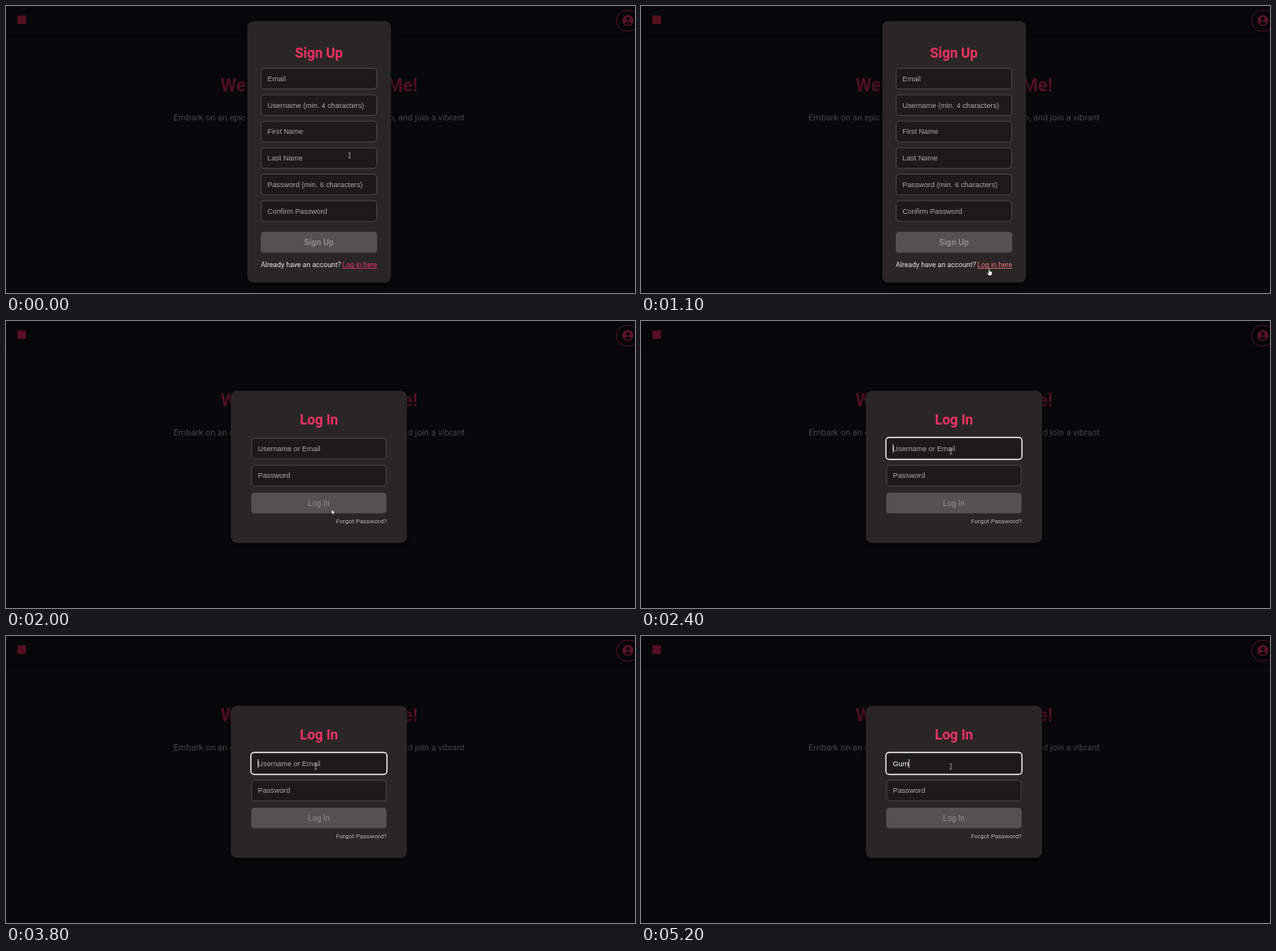
Animation of 800x366 px, one loop 5.3 s. Source, as an HTML page:

```html
<!DOCTYPE html>
<html lang="en">
<head>
<meta charset="utf-8">
<title>Sign up and log in</title>
<style>
  html, body { margin: 0; width: 100%; height: 100%; overflow: hidden; background: #08070a; }
  svg { display: block; width: 100vw; height: 100vh; }
  text { font-family: Roboto, sans-serif; white-space: pre; }
  .title { font-size: 17.5px; font-weight: 700; fill: #ee3262; text-anchor: middle; }
  .hero { font-size: 23px; font-weight: 700; fill: #4e1021; }
  .lead { font-size: 11.2px; fill: #454446; }
  .note { font-size: 9px; fill: #e6e5e5; }
  .forgot { font-size: 8px; fill: #b4b2b2; text-anchor: end; }
  .form { font-family: "Liberation Sans", Arial, sans-serif; font-size: 9.3px; fill: #a9a7a7; }
  .btn { font-family: "Liberation Sans", Arial, sans-serif; font-size: 10px; fill: #918f8f; text-anchor: middle; }
  .tip { font-family: "Noto Sans", sans-serif; font-size: 6.5px; fill: #e4e4e4; }
  .end { text-anchor: end; }
  .card { fill: #2a2828; filter: url(#shadow); }
  .field { fill: #1c1a1b; stroke: #494747; }
  .button { fill: #535151; }
</style>
</head>
<body>
<svg viewBox="0 0 800 366" preserveAspectRatio="none">
  <defs>
    <filter id="shadow" x="-20%" y="-20%" width="140%" height="140%">
      <feDropShadow dx="0" dy="2" stdDeviation="5" flood-color="#000" flood-opacity=".7"/>
    </filter>
  </defs>

  <rect width="800" height="366" fill="#08070a"/>
  <rect width="800" height="38" fill="#070609"/>
  <rect y="37" width="800" height="2" fill="#050406"/>
  <rect x="14.5" y="12" width="11" height="11" fill="#54101f"/>
  <g fill="none" stroke="#5a1226">
    <rect x="776.5" y="5.5" width="29" height="26.5" rx="13.2"/>
    <circle cx="791" cy="18.5" r="7" fill="#5a1226" stroke="none"/>
    <circle cx="791" cy="16.4" r="2.3" fill="#09070a" stroke="none"/>
    <path d="M786.6 22.2Q791 17.9 795.4 22.2Q791 26.2 786.6 22.2Z" fill="#09070a" stroke="none"/>
  </g>
  <text class="hero" x="273" y="109">We</text>
  <text class="hero end" x="523.5" y="109">Me!</text>
  <text class="lead" x="213" y="146">Embark on an epic</text>
  <text class="lead end" x="583.5" y="146">o, and join a vibrant</text>

  <g id="signup">
    <rect class="card" x="307" y="19.5" width="182.5" height="333" rx="7"/>
    <text class="title" x="398" y="65.8">Sign Up</text>
    <g id="signupFields"></g>
    <rect class="button" x="324" y="288" width="148" height="26.5" rx="4"/>
    <text class="btn" x="398" y="304.7" font-weight="700">Sign Up</text>
    <text class="note" x="324" y="333">Already have an account?</text>
    <g id="link" fill="#ee3266">
      <text class="note end" x="472" y="333" style="fill:inherit">Log in here</text>
      <rect x="428" y="334" width="44" height=".8"/>
    </g>
  </g>

  <g id="login">
    <rect class="card" x="286" y="89" width="224" height="194" rx="8"/>
    <text class="title" x="398" y="132.3">Log In</text>
    <g id="loginFields"></g>
    <rect id="focus" x="311.5" y="148.5" width="173" height="28" rx="4" fill="#1c1a1b" stroke="#fff" stroke-width="1.4"/>
    <text id="hint" class="form" x="320.3" y="165.8">Username or Email</text>
    <text id="typed" class="form" x="320.3" y="165.8" style="fill:#fff"></text>
    <rect id="caret" y="157" width=".8" height="11" fill="#fff"/>
    <rect class="button" x="312" y="219" width="172" height="26.3" rx="4"/>
    <text class="btn" x="398" y="235.7">Log In</text>
    <text class="forgot" x="484" y="257.8">Forgot Password?</text>
  </g>

  <g id="tooltip">
    <rect x="442.5" y="199.5" width="79" height="14.5" fill="#1d1d1e" stroke="#858585"/>
    <text class="tip" x="447" y="209.2">Please fill out this field.</text>
  </g>

  <g id="pointer">
    <path id="beam" d="M-1.5 -3.5H-.4L0 -3L.4 -3.5H1.5M0 -3V3M-1.5 3.5H-.4L0 3L.4 3.5H1.5" fill="none" stroke="#b9b9b9" stroke-width=".8"/>
    <path id="arrow" d="M0 0V6.6L1.5 5.3L2.5 7.7L3.6 7.2L2.6 5L4.6 4.8Z" fill="#fff" stroke="#000" stroke-width=".5"/>
    <path id="hand" d="M-1 .4Q-.2 -.8 .5 .4V3L3.1 3.7Q3.8 4 3.6 5L2.9 8.7H-.9L-3 5.6Q-2.9 4.5 -1.9 4.9L-1 5.8Z" fill="#fff" stroke="#000" stroke-width=".5"/>
  </g>
</svg>
<script>
const LOOP = 5300, STEP = 100;
const $ = id => document.getElementById(id);
const show = (id, on) => $(id).setAttribute("display", on ? "inline" : "none");
const between = (t, a, b) => t >= a && t < b;

const field = (x, y, w, label) =>
  `<rect class="field" x="${x + .5}" y="${y + .5}" width="${w - 1}" height="26.3" rx="3.5"/>` +
  `<text class="form" x="${x + 8.5}" y="${y + 16.8}">${label}</text>`;

const FIELD_Y = 79, FIELD_GAP = 33.75;
$("signupFields").innerHTML = ["Email", "Username (min. 4 characters)", "First Name",
  "Last Name", "Password (min. 6 characters)", "Confirm Password"]
  .map((label, i) => field(324, FIELD_Y + i * FIELD_GAP, 148, label)).join("");
$("loginFields").innerHTML = field(312, 149, 172, "") + field(312, 183.5, 172, "Password");

// Pointer path: time, x, y of the hotspot
const PATH = [
  [0, 437, 190.5], [300, 437, 191], [400, 437, 196], [500, 437, 208.3],
  [600, 441, 328], [800, 443, 335], [1500, 443, 335], [1600, 442, 330],
  [1900, 424, 272], [2100, 404, 208], [2300, 394, 166.5]
];

function pointerAt(t) {
  const i = PATH.findIndex(p => p[0] > t);
  if (i < 0) return PATH[PATH.length - 1].slice(1);
  const [t0, x0, y0] = PATH[i - 1], [t1, x1, y1] = PATH[i];
  const k = (t - t0) / (t1 - t0);
  return [x0 + (x1 - x0) * k, y0 + (y1 - y0) * k];
}

function pointerKind(y, signup) {
  if (signup) {
    if (y > 323) return "hand";
    const d = y - FIELD_Y;
    return d > 0 && d < FIELD_GAP * 6 && d % FIELD_GAP < 28.5 ? "beam" : "arrow";
  }
  return between(y, 149, 177) || between(y, 183, 211) ? "beam" : "arrow";
}

const NAME = "Gum", KEYS = [4800, 5000, 5200];

function render(t) {
  const signup = t < 1300;
  show("signup", signup);
  show("login", !signup);
  show("tooltip", between(t, 200, 600));

  const [x, y] = pointerAt(t), kind = pointerKind(y, signup);
  $("pointer").setAttribute("transform", `translate(${x} ${y})`);
  for (const k of ["beam", "arrow", "hand"]) show(k, k === kind);
  $("link").setAttribute("fill", kind === "hand" ? "#ee7377" : "#ee3266");

  const focused = t >= 2400;
  const count = KEYS.filter(k => t >= k).length;
  $("typed").textContent = NAME.slice(0, count);
  show("hint", !count);
  show("focus", focused);
  show("caret", focused && !between(t, 2800, 3300) && !between(t, 4000, 4500));
  const width = count ? $("typed").getComputedTextLength() : 0;
  $("caret").setAttribute("x", 320.3 + width);
}

const start = performance.now();
function tick() {
  const t = (performance.now() - start) % LOOP;
  render(Math.floor(t / STEP) * STEP);
  requestAnimationFrame(tick);
}
tick();
</script>
</body>
</html>
```
